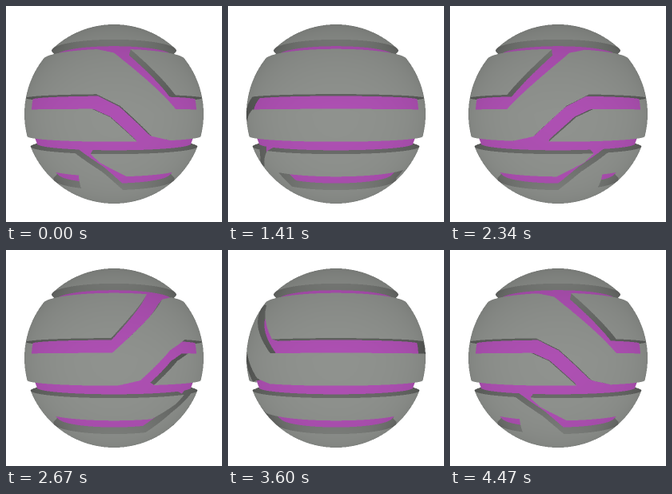
An HTML page with a canvas that plays this animation: 270 by 270 pixels, repeating every 4.5 s.

```html
<!DOCTYPE html>
<html lang="en">
<head>
<meta charset="utf-8">
<title>Grooved sphere</title>
<style>
html, body { margin: 0; height: 100%; overflow: hidden; background: #fff; }
canvas { display: block; width: 100vw; height: 100vh; }
</style>
</head>
<body>
<canvas id="stage" width="270" height="270"></canvas>
<script>
const SIZE = 270, LOOP = 4500, FRAMES = 150;
const CAM = 4, FOCAL = 112 * Math.sqrt(CAM * CAM - 1), INNER = 0.925;
const W = 3000, H = 1500;          // cells of the longitude/latitude map
const STEPS = 16, SUB = 2;         // samples along a ray, subsamples per axis
const DEG = 180 / Math.PI;

// Piecewise linear edge: longitude as a function of latitude.
function edge(...points) {
  return lat => {
    let i = 1;
    while (i < points.length - 1 && lat < points[i][0]) i++;
    const [a, x] = points[i - 1], [b, y] = points[i];
    return x + (y - x) * (lat - a) / (b - a);
  };
}
const topLeft = edge([36.8, -11], [34, 0], [2.5, 34.5]);
const topRight = edge([36.8, 11], [10, 35]);
const midUpper = edge([10, -9], [4, 3], [-11.4, 20], [-14, 32]);
const midLower = edge([2.5, -11], [-1.5, -2], [-14, 12]);
const lowLeft = edge([-20.8, -22], [-32, -7], [-46.5, 7]);
const lowRight = edge([-20.8, -13], [-26, -8], [-35, 8]);

// Two grooves run all the way round.
const isRing = lat => (lat > 36.8 && lat < 45) || (lat > -20.8 && lat < -14);

// The pattern is mirrored about the meridian at -90 degrees.
function isGroove(lat, lon) {
  const turn = ((lon + 90) % 360 + 540) % 360 - 180;
  const x = Math.abs(turn) - 90;
  if (lat > 45 || lat < -46.5) return false;
  if (isRing(lat)) return true;
  if (lat > 2.5 && x > topLeft(lat) && (lat < 10 || x < topRight(lat))) return true;
  if (lat > -14) {
    return lat < 10 && x < midUpper(lat) && (lat > 2.5 || x > midLower(lat));
  }
  if (x > lowLeft(lat) && (lat < -35 || x < lowRight(lat))) return true;
  return lat < -35 && x < -25.5 + (lat + 40) * 0.35;
}

// Rows are doubled so that a rotated lookup never has to wrap.
const solid = new Uint8Array(H * W * 2);
for (let r = 0; r < H; r++) {
  const lat = 90 - (r + 0.5) * 180 / H;
  for (let c = 0; c < W; c++) {
    const at = r * W * 2 + c;
    solid[at] = solid[at + W] = isGroove(lat, (c + 0.5) * 360 / W - 180) ? 0 : 1;
  }
}

const SHELL = [143, 146, 142], CORE = [173, 80, 178];

// Trace each fixed view ray once; only the map turns.
const rays = [];
function trace(px, py) {
  const len = Math.hypot(px, py, FOCAL);
  const dx = px / len, dy = -py / len, dz = -FOCAL / len;
  const b = -CAM * dz;
  const miss = CAM * CAM - b * b;
  if (miss >= 1) return null;
  const half = Math.sqrt(1 - miss);
  const near = b - half;
  const core = miss < INNER * INNER;
  const far = core ? b - Math.sqrt(INNER * INNER - miss) : b + half;
  const cells = new Int32Array(STEPS);
  for (let i = 0; i < STEPS; i++) {
    const t = near + (far - near) * i / (STEPS - 1);
    const x = dx * t, y = dy * t, z = CAM + dz * t;
    const lat = Math.asin(y / Math.hypot(x, y, z)) * DEG;
    const lon = Math.atan2(x, z) * DEG;
    const row = Math.min(H - 1, Math.floor((90 - lat) / 180 * H));
    const col = Math.floor((lon + 180) / 360 * W) % W;
    cells[i] = row * W * 2 + col;
  }
  const nx = dx * near, ny = dy * near, nz = CAM + dz * near;
  const shade = 0.84 + 0.16 * nz - 0.07 * Math.max(0, ny);
  // Walls brighten as they turn towards the viewer.
  const wall = shade * (0.6 + 0.4 * Math.abs(ny) * nz / Math.hypot(nx, nz));
  const open = !core && isRing(Math.asin(ny) * DEG);
  return { cells, core, open, shade, wall };
}
for (let y = 0; y < SIZE; y++) {
  for (let x = 0; x < SIZE; x++) {
    const group = [];
    for (let k = 0; k < SUB * SUB; k++) {
      const sx = (k % SUB + 0.5) / SUB, sy = (Math.floor(k / SUB) + 0.5) / SUB;
      const ray = trace(x + sx - SIZE / 2, y + sy - SIZE / 2);
      if (ray) group.push(ray);
    }
    if (group.length) rays.push({ at: (y * SIZE + x) * 4, group });
  }
}

const ctx = document.getElementById("stage").getContext("2d");
const image = ctx.createImageData(SIZE, SIZE);
image.data.fill(255);

function draw(frame) {
  const shift = (W - Math.round(frame * W / FRAMES)) % W;
  const out = image.data, total = SUB * SUB;
  for (const { at, group } of rays) {
    let r = (total - group.length) * 255, g = r, b = r;
    for (const { cells, core, open, shade, wall } of group) {
      let i = 0;
      while (i < STEPS && !solid[cells[i] + shift]) i++;
      const through = i === STEPS;
      if (through && open) {
        r += 255; g += 255; b += 255;
        continue;
      }
      const color = through && core ? CORE : SHELL;
      const light = i > 0 && !through ? wall : shade;
      r += color[0] * light;
      g += color[1] * light;
      b += color[2] * light;
    }
    out[at] = r / total;
    out[at + 1] = g / total;
    out[at + 2] = b / total;
  }
  ctx.putImageData(image, 0, 0);
}

let start = null, shown = -1;
function tick(now) {
  if (start === null) start = now;
  const frame = Math.floor((now - start) % LOOP / LOOP * FRAMES + 1e-6) % FRAMES;
  if (frame !== shown) draw(shown = frame);
  requestAnimationFrame(tick);
}
draw(shown = 0);
requestAnimationFrame(tick);
</script>
</body>
</html>
```
